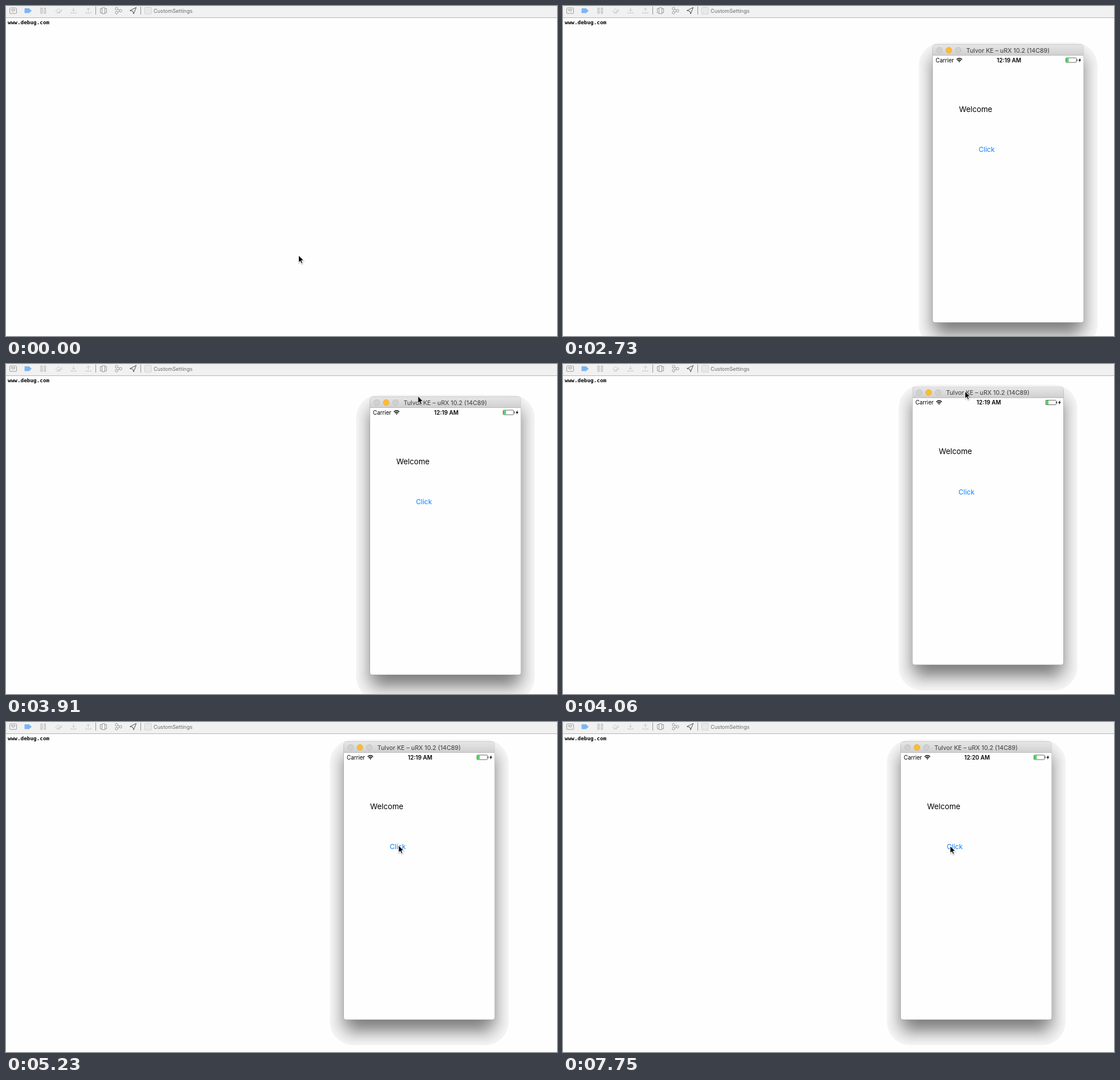
These frames come from a looping animation (967 by 579 pixels, 8000 ms). An HTML page:

```html
<!DOCTYPE html>
<html lang="en">
<head>
<meta charset="utf-8">
<title>Debug console</title>
<style>
  html, body { margin: 0; width: 100%; height: 100%; overflow: hidden; background: #fefefe; }
  svg { display: block; width: 100%; height: 100%; }
  text { font-family: Inter, "Open Sans", sans-serif; }
  .console { font: bold 9.35px "DejaVu Sans Mono", monospace; }
  .icon { fill: none; stroke: #999; }
  .off { stroke: #c6c6c6; }
</style>
</head>
<body>
<svg viewBox="0 0 967 579">
  <defs>
    <linearGradient id="bar" x2="0" y2="1">
      <stop offset="0" stop-color="#e6e6e6"/>
      <stop offset="1" stop-color="#cfcfcf"/>
    </linearGradient>
    <path id="arrow" d="M0-3.5V3M-3 0L0 3 3 0"/>
    <path id="tray" d="M-4.5 0V2H4.5V0"/>
    <path id="pointer" d="M0 0V12.6L2.9 9.9 4.9 14.3 7 13.4 5.1 9.1H9Z"/>
  </defs>
  <rect width="967" height="579" fill="#fefefe"/>

  <g id="toolbar">
    <rect width="967" height="20" fill="#f1f1f1"/>
    <rect y="20" width="967" height="1" fill="#b4b4b4"/>
    <g class="icon">
      <rect x="6.5" y="3.5" width="12" height="9.5" rx="1"/>
      <path d="M9 6.5H16L12.5 10Z"/>
      <path d="M33 4.5H40.5L44.5 8.3 40.5 12H33Z" fill="#7fb5f3" stroke="#7fb5f3" stroke-linejoin="round"/>
      <path d="M61 3.5h2.5v9.5h-2.5zM67 3.5h2.5v9.5h-2.5z" stroke="#b0b0b0"/>
      <g class="off">
        <path d="M86.5 10L92 4.5 96 8.5M97.5 5.5V9.5H93.5M89.5 12.5H94.5V10.5H89.5Z"/>
        <use href="#arrow" x="118.5" y="6.5"/>
        <use href="#tray" x="118.5" y="10.5"/>
        <use href="#arrow" transform="translate(144.5 6.5) scale(1 -1)"/>
        <use href="#tray" x="144.5" y="10.5"/>
      </g>
      <path d="M157.5 1V15M236.5 1V15" stroke="#929292"/>
      <path d="M168.5 3H173.5V13.5H168.5ZM168 4.5H165.5V12H168M174 4.5H176.5V12H174"/>
      <circle cx="194" cy="4.8" r="2.3"/>
      <circle cx="194" cy="11.7" r="2.3"/>
      <circle cx="201" cy="8.3" r="2.3"/>
      <path d="M196.2 5.8L199 7.3M196.2 10.7L199 9.2"/>
      <path d="M217.5 8L228.5 2.5 224 13.8 222.5 9Z" stroke="#4a4a4a"/>
      <rect x="243.5" y="2.5" width="11.5" height="11.5" rx="1" stroke="#cacaca"/>
      <path d="M245.5 5.3h8m-8 3h8m-8 3h8" stroke="#c2c2c2" stroke-dasharray="1.6 1.4"/>
    </g>
    <text x="259" y="11.5" font-size="9.15" fill="#6c6c6c">CustomSettings</text>
  </g>

  <text class="console" x="3" y="32">www.debug.com</text>

  <g id="phone">
    <g id="shadow"></g>
    <rect x="-.5" y="-.5" width="265.5" height="488" rx="4.5" fill="#a4a4a4"/>
    <rect width="264.5" height="487" rx="4" fill="#fefefe"/>
    <path d="M0 19V4Q0 0 4 0H260.5Q264.5 0 264.5 4V19Z" fill="url(#bar)"/>
    <rect y="18" width="264.5" height="1" fill="#bababa"/>
    <g fill="#d0d0d0" stroke="#bcbcbc" stroke-width=".8">
      <circle cx="11.7" cy="9.6" r="5"/>
      <circle cx="28.2" cy="9.6" r="5" fill="#fdbd30" stroke="#e2a42b"/>
      <circle cx="44.7" cy="9.6" r="5"/>
    </g>
    <text x="132" y="13.7" font-size="10.7" text-anchor="middle" fill="#3c3c3c">Tulvor KE – uRX 10.2 (14C89)</text>

    <text x="5" y="30.5" font-size="9.8">Carrier</text>
    <g fill="none" stroke="#000" stroke-width="1.5">
      <path d="M41.7 26Q46.5 21.6 51.3 26M43.5 28Q46.5 25.3 49.5 28"/>
      <path d="M45 29L46.5 31 48 29Q46.5 27.9 45 29Z" fill="#000" stroke="none"/>
    </g>
    <text id="clock" x="133.7" y="30.5" font-size="9.9" font-weight="600" text-anchor="middle"></text>
    <rect x="233.5" y="23" width="18.5" height="8" rx="1.2" fill="none" stroke="#555" stroke-width=".9"/>
    <rect x="234" y="23.5" width="4.5" height="7" fill="#4cd964"/>
    <rect x="252.6" y="25.5" width="1.2" height="3" fill="#444"/>
    <path d="M259 23L255.5 27.7H257.7L256.8 31 260.3 26.3H258.2Z"/>

    <text x="46" y="117.5" font-size="13.3">Welcome</text>
    <text x="80.5" y="188.3" font-size="12" fill="#0a7fff">Click</text>
  </g>

  <g id="cursor">
    <use href="#pointer" x=".5" y="1.5" fill="none" stroke="#000" stroke-width="2.5" stroke-linejoin="round" opacity=".13"/>
    <use href="#pointer" stroke="#fff" stroke-width=".9"/>
  </g>
</svg>
<script>
  const LOOP = 8000, PHONE_OPENS = 2730, MINUTE_TURNS = 7750;
  const NS = "http://www.w3.org/2000/svg";
  const byId = id => document.getElementById(id);
  const phone = byId("phone"), cursor = byId("cursor"), clock = byId("clock");

  // Slow start for a > 1, soft landing for b > 1.
  const ease = (a, b) => u => 1 - (1 - u ** a) ** b;
  const linear = ease(1, 1);

  const bezier = (p, q, r, v) => (1 - v) ** 2 * p + 2 * v * (1 - v) * q + v * v * r;

  // A move along a curve, shown in a few hard steps between two times.
  function move(start, end, steps, easing, from, via, to) {
    const gap = (end - start) / (steps - 1);
    const at = t => {
      const step = Math.min(steps, 1 + Math.floor((t - start) / gap + 0.05));
      const v = easing(step / steps);
      return from.map((p, i) => bezier(p, via[i], to[i], v));
    };
    return { start, from, at };
  }

  const rest = [513.5, 437.5], exit = [295, 620];
  const grip = [751, 78], drop = [695, 45], button = [677, 224];
  const cursorMoves = [
    move(1500, 1980, 4, linear, rest, [405, 529], exit),
    move(3020, 3620, 5, linear, [582, 470], [757, 130], grip),
    move(3910, 4350, 4, ease(1, 2.4), grip, [723, 51], drop),
    move(4650, 5660, 8, ease(1.5, 3.2), drop, [735, 198], button),
    move(5810, 6110, 3, linear, button, [678, 221], [679.5, 217.5])
  ];
  const phoneMoves = [
    move(3910, 4350, 4, ease(2.2, 4.1), [649, 68], [621, 37], [593, 35])
  ];

  function place(part, moves, t) {
    const current = moves.filter(m => m.start <= t).pop();
    const [x, y] = current ? current.at(t) : moves[0].from;
    const snap = n => Math.round(n * 2) / 2;
    part.setAttribute("transform", `translate(${snap(x)} ${snap(y)})`);
  }

  // Soft shadow in visible bands, darker towards the window.
  function drawShadow() {
    for (let d = 24.5; d > -24; d -= 2.7) {
      const level = 1 / (1 + Math.exp((d - 1.5) / 10));
      const grey = Math.round(255 - 140 * level);
      const band = document.createElementNS(NS, "rect");
      const attrs = {
        x: -d, y: 20.5 - d, width: 264.5 + 2 * d, height: 487 + 2 * d,
        rx: 30 + 0.45 * d, fill: `rgb(${grey},${grey},${grey})`
      };
      for (const key in attrs) band.setAttribute(key, attrs[key]);
      byId("shadow").append(band);
    }
  }

  function render(t) {
    place(phone, phoneMoves, t);
    place(cursor, cursorMoves, t);
    phone.setAttribute("visibility", t < PHONE_OPENS ? "hidden" : "visible");
    clock.textContent = t < MINUTE_TURNS ? "12:19 AM" : "12:20 AM";
  }

  const start = performance.now();
  function tick() {
    render((performance.now() - start) % LOOP);
    requestAnimationFrame(tick);
  }

  drawShadow();
  tick();
</script>
</body>
</html>
```
